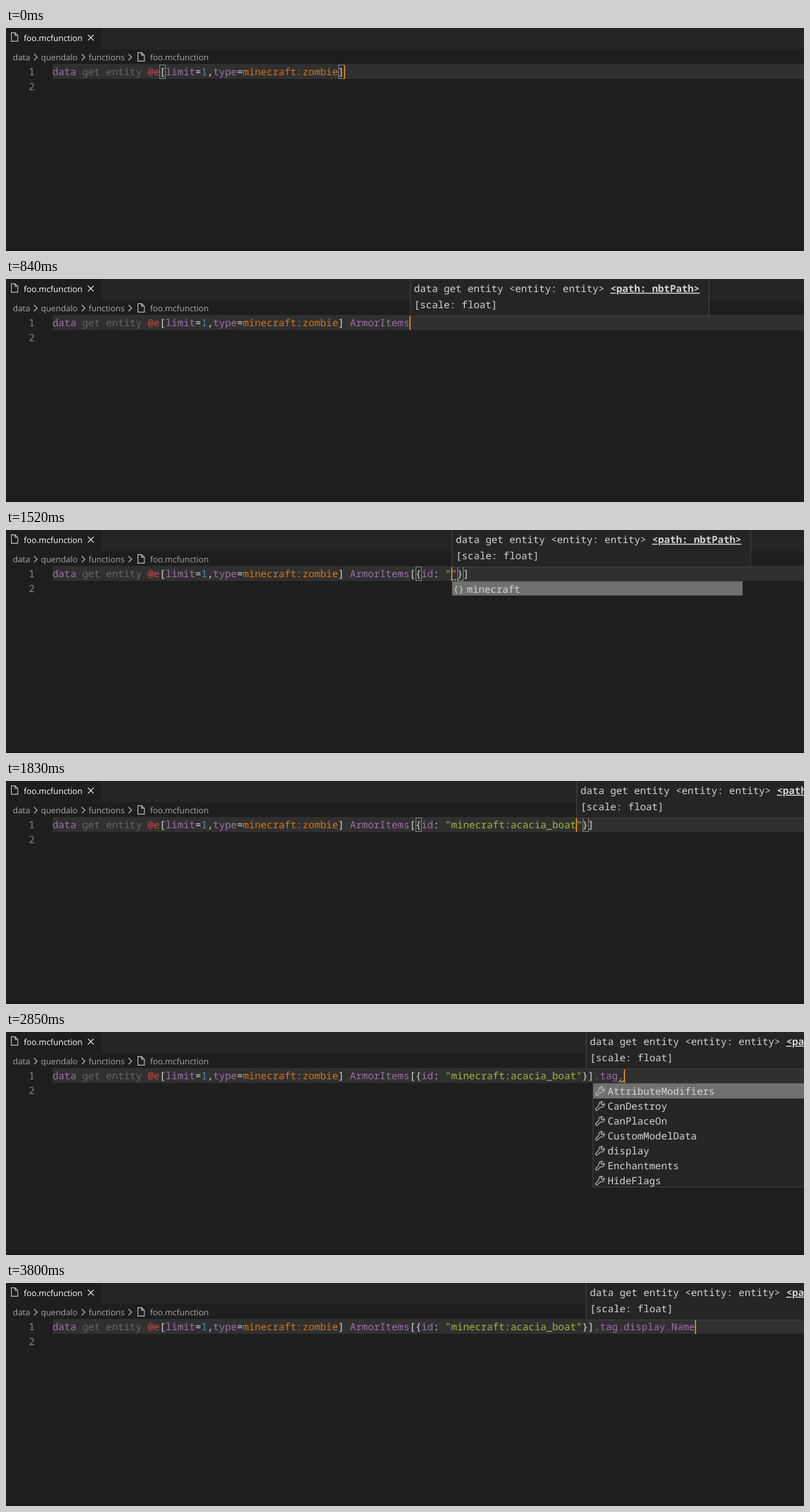
An HTML page that plays this animation: 1280x359 px, repeating every 3910 ms.

```html
<!DOCTYPE html>
<html lang="en">
<head>
<meta charset="utf-8">
<title>Path completion</title>
<style>
  html, body { margin: 0; height: 100%; overflow: hidden; background: #1e1e1e; }
  svg { display: block; width: 100vw; height: 100vh; }
  text { white-space: pre; text-rendering: geometricPrecision; font: 15.925px "Noto Sans Mono", monospace; fill: #d4d4d4; }
  .ui text { font: 13.3px "Open Sans", "Noto Sans", sans-serif; fill: #a9a9a9; }
  .icon { fill: none; stroke: #c5c5c5; stroke-width: 1.2; }
  .box { fill: #252526; stroke: #454545; }
  .active { font-weight: bold; text-decoration: underline; }
  .match { font-weight: bold; fill: #e58520; }
</style>
</head>
<body>
<svg viewBox="0 0 1280 359" preserveAspectRatio="none">
  <defs>
    <path id="file" class="icon" d="M.6 .6H6.5L10.9 5V14.4H.6ZM6.5 .6V5H10.9"/>
    <path id="chevron" class="icon" d="M0 0L5 5L0 10"/>
    <path id="wrench" class="icon" d="M18.6 8.2L16 10.8L13.2 8L15.8 5.4A4.6 4.6 0 0 0 10 11.2L4.9 16.8A1.7 1.7 0 0 0 7.2 19.1L12.8 14A4.6 4.6 0 0 0 18.6 8.2Z"/>
  </defs>
  <g class="ui">
    <path fill="#252526" d="M153 0H1280V34H153Z"/>
    <path fill="#1a1a1a" d="M0 356H1280V359H0Z"/>
    <use href="#file" x="8" y="7"/>
    <text x="28.5" y="21" style="fill:#fff">foo.mcfunction</text>
    <path class="icon" style="stroke:#e8e8e8" d="M131.5 11L140.5 20M140.5 11L131.5 20"/>
    <text x="11" y="52">data</text>
    <use href="#chevron" x="45" y="42"/>
    <text x="56" y="52">quendalo</text>
    <use href="#chevron" x="121.500" y="42"/>
    <text x="132.500" y="52">functions</text>
    <use href="#chevron" x="196.500" y="42"/>
    <use href="#file" x="211" y="39"/>
    <text x="231" y="52">foo.mcfunction</text>
  </g>
  <path fill="#303030" d="M75 58H1280V82H75Z"/>
  <text x="36.500" y="75.500" style="fill:#8a8a8a">1</text>
  <text x="36.500" y="99.500" style="fill:#858585">2</text>
  <g id="editor"></g>
</svg>
<script>
const LOOP = 3910, CHAR = 9.555, LEFT = 74.5, START = 49;
const colX = col => LEFT + col * CHAR;
const PURPLE = '#9d70a8', GREEN = '#9fb83d', PLAIN = '#d4d4d4', YELLOW = '#d0a800', PALE = '#cdbba4';

const command = [
  ['data', PURPLE], [' get entity ', '#666'], ['@e', '#d64545'], ['[', PLAIN], ['limit', PURPLE],
  ['=', PLAIN], ['1', '#5288bb'], [',', PLAIN], ['type', PURPLE], ['=', PLAIN],
  ['minecraft:zombie', '#da7310'], [']', PLAIN]];

const words = s => s.split(' ');
const zombieTags = words('AbsorptionAmount Air ArmorDropChances ArmorItems Attributes Brain CanBreakDoors CanPickUpLoot CustomName CustomNameVisible DeathLootTable DeathTime');
const armorTags = words('ArmorDropChances ArmorItems AbsorptionAmount');
const slotTags = words('Count id Slot tag');
const itemIds = words('boat button door fence fence_gate leaves log planks pressure_plate sapling sign slab').map(s => 'acacia_' + s);
const itemTags = words('AttributeModifiers CanDestroy CanPlaceOn CustomModelData display Enchantments HideFlags');
const displayTags = words('Color Lore Name');

const ARMOR = ' ArmorItems', ID = ARMOR + '[{id: ', NS = ID + '"minecraft:';
const ITEM = NS + 'acacia_boat', PATH = ITEM + '"}]', TAG = PATH + '.tag', DISPLAY = TAG + '.display';

// Each step changes part of the state: text before and after the caret, caret,
// matched brackets, hint column, suggestion list with query, squiggle [from, to, colour].
const steps = [
  [0, { text: '', tail: '', caret: true, brackets: [18, 48], hint: 0, list: [], query: '', selected: 0, squiggle: null }],
  [70, { text: ' ', brackets: [] }],
  [100, { hint: 50 }],
  [130, { list: zombieTags }],
  [160, { text: ' A', query: 'A', squiggle: [50, 51, YELLOW] }],
  [190, { text: ' Ar', list: armorTags, query: 'Ar', squiggle: [50, 52, YELLOW] }],
  [220, { hint: 52 }],
  [250, { text: ' Arm', query: 'Arm', squiggle: [50, 53, YELLOW] }],
  [280, { hint: 52.72 }],
  [340, { selected: 1 }],
  [430, { text: ARMOR, list: [], query: '', selected: 0 }],
  [490, { hint: 60 }],
  [560, { squiggle: [50, 60, YELLOW] }],
  [630, { squiggle: null }],
  [700, { caret: false }],
  [840, { caret: true }],
  [870, { text: ARMOR + '[', tail: ']', brackets: [60, 61] }],
  [930, { hint: 61 }],
  [990, { text: ARMOR + '[{', tail: '}]', brackets: [61, 62] }],
  [1050, { hint: 62 }],
  [1110, { list: slotTags }],
  [1220, { text: ARMOR + '[{i', query: 'i', list: ['id'], brackets: [61, 63] }],
  [1340, { hint: 63 }],
  [1400, { text: ID, list: [], query: '', brackets: [61, 66] }],
  [1430, { hint: 66 }],
  [1460, { text: ID + '"', tail: '"}]', brackets: [61, 68] }],
  [1490, { hint: 67 }],
  [1520, { list: ['minecraft'], squiggle: [67, 68, 'dots'] }],
  [1590, { text: NS, list: [], brackets: [61, 78], squiggle: null }],
  [1630, { hint: 77, list: itemIds }],
  [1770, { text: ITEM, list: [], brackets: [61, 89] }],
  [1830, { hint: 88 }],
  [1930, { text: ITEM + '"', tail: '}]' }],
  [1960, { text: ITEM + '"}', tail: ']' }],
  [2000, { text: PATH, tail: '', brackets: [60, 90] }],
  [2030, { hint: 91 }],
  [2170, { caret: false }],
  [2260, { text: PATH + '.', caret: true, brackets: [], squiggle: [91, 92, PALE] }],
  [2300, { list: slotTags }],
  [2340, { text: PATH + '.t', list: ['tag'], query: 't', squiggle: null }],
  [2420, { text: TAG, list: [], query: '' }],
  [2500, { text: TAG + '.', squiggle: [95, 96, PALE] }],
  [2550, { list: itemTags }],
  [2710, { caret: false }],
  [2850, { caret: true }],
  [2950, { text: TAG + '.d', query: 'd', squiggle: null }],
  [2990, { list: ['display'] }],
  [3090, { text: DISPLAY, list: [], query: '' }],
  [3250, { text: DISPLAY + '.', squiggle: [103, 104, PALE] }],
  [3300, { list: displayTags }],
  [3390, { text: DISPLAY + '.N', list: ['Name'], query: 'N', squiggle: null }],
  [3500, { text: DISPLAY + '.Name', list: [], query: '' }],
  [3660, { caret: false }],
  [3800, { caret: true }]
];

const escapeText = s => s.replace(/</g, '&lt;');
const text = (x, y, body) => `<text x="${x}" y="${y}">${body}</text>`;
const rect = (x, y, w, h, attrs) => `<rect x="${x}" y="${y}" width="${w}" height="${h}" ${attrs}/>`;
const span = ([s, color]) => `<tspan style="fill:${color}">${escapeText(s)}</tspan>`;

function pathTokens(s) {
  return (s.match(/"[^"]*"?|[\[\]{}: ]+|[^"\[\]{}: ]+/g) || [])
    .map(part => [part, part[0] === '"' ? GREEN : /^[\[\]{}: ]/.test(part) ? PLAIN : PURPLE]);
}

function drawSquiggle([from, to, color]) {
  const x = colX(from);
  if (color === 'dots') return [1, 5, 9].map(dx => rect(x + dx, 79, 2, 2, 'fill="#b0b0b0"')).join('');
  let d = `M${x} 81`;
  for (let dx = 3, up = true; x + dx <= colX(to) + 1; dx += 3, up = !up) d += `L${x + dx} ${up ? 78 : 81}`;
  return `<path d="${d}" fill="none" stroke="${color}" stroke-width="1.2"/>`;
}

function drawHint(col) {
  const x = Math.min(Math.round(colX(col)), 930) + .5;
  return rect(x, -1, 479, 60.5, 'class="box"') +
    text(x + 6, 21, escapeText('data get entity <entity: entity> ') + '<tspan class="active">&lt;path: nbtPath></tspan>') +
    text(x + 6, 47, '[scale: float]');
}

function highlight(item, query) {
  let i = 0;
  return [...item].map(ch => ch === query[i] ? (i++, `<tspan class="match">${ch}</tspan>`) : ch).join('');
}

function drawList({ list, query, selected }, caretX) {
  const x = Math.min(Math.round(caretX), 941);
  return rect(x + .5, 82.5, 466, list.length * 24 - 1, 'class="box"') + list.map((item, i) => {
    const y = 83 + i * 24;
    const icon = item === 'minecraft'
      ? text(x + 2.5, y + 17, '<tspan style="font-size:14px">{}</tspan>')
      : `<use href="#wrench" x="${x}" y="${y}"/>`;
    return (i === selected ? rect(x + 1, y, 465, i === list.length - 1 ? 22 : 24, 'fill="#707070"') : '') +
      icon + text(x + 24, y + 17.5, highlight(item, query));
  }).join('');
}

function draw(state) {
  const caretX = colX(START + state.text.length);
  return state.brackets.map(col => rect(Math.round(colX(col)) + .5, 59.5, 9, 22, 'fill="#0640061a" stroke="#888"')).join('') +
    text(LEFT, 75.5, [...command, ...pathTokens(state.text + state.tail)].map(span).join('')) +
    (state.squiggle ? drawSquiggle(state.squiggle) : '') +
    (state.caret ? rect(Math.round(caretX) - 1, 60, 2, 22, 'fill="#d98324"') : '') +
    (state.hint ? drawHint(state.hint) : '') +
    (state.list.length ? drawList(state, caretX) : '');
}

const editor = document.getElementById('editor');
let shown = -1;
function tick() {
  const t = performance.now() % LOOP;
  const count = steps.filter(([at]) => at <= t).length;
  if (count !== shown) {
    editor.innerHTML = draw(Object.assign({}, ...steps.slice(0, count).map(step => step[1])));
    shown = count;
  }
  requestAnimationFrame(tick);
}
tick();
</script>
</body>
</html>
```
